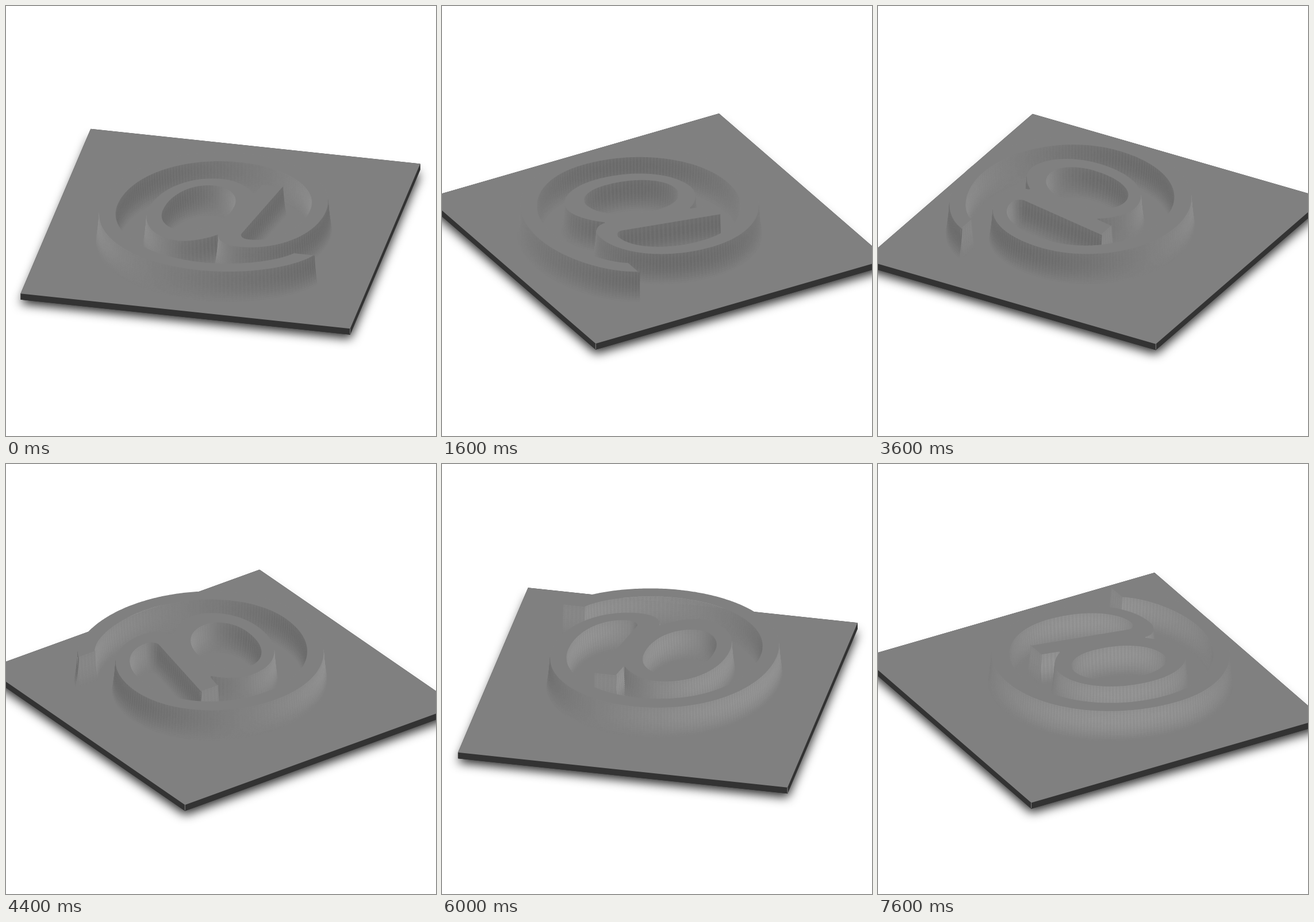
Write an HTML page with a canvas that moves like this. It is 748 px wide and 748 px high and loops after 8 s.

```html
<!DOCTYPE html>
<html lang="en">
<head>
<meta charset="utf-8">
<title>Embossed at sign on a turning plate</title>
<style>
  html, body { margin: 0; width: 100%; height: 100%; overflow: hidden; background: #fff; }
  canvas { display: block; width: 100vw; height: 100vh; }
</style>
</head>
<body>
<canvas id="stage" width="748" height="748"></canvas>
<script>
const ctx = document.getElementById('stage').getContext('2d');

const STEP_MS = 400, STEPS = 20, STEP_DEG = 12;
const PIVOT = { x: 374.2, y: 388.2 };
const TILT = 0.5;
const HALF = 293;
const THICK = 10.5;
const RELIEF = 49;
const SLICES = 16;
const GRAY = 128, CONTRAST = 19;
const DARK_SIDE = 22 * Math.PI / 180;
const ROUND = 0.565;
const STRIP = 3;

const mix = (a, b, t) => a + (b - a) * t;
const toPlate = (x, y) => [0.236 * x - 249.2, 161.6 - 0.241 * y];

// Pen in font units: every curve bends towards one corner point.
class Pen {
  constructor(x, y) { this.x = x; this.y = y; this.points = []; }

  bend(cx, cy, x, y) {
    const { x: x0, y: y0 } = this;
    const cubic = (a, c, b, t) => {
      const s = 1 - t;
      return s * s * s * a + 3 * s * s * t * mix(a, c, ROUND) +
        3 * s * t * t * mix(b, c, ROUND) + t * t * t * b;
    };
    const size = 0.24 * (Math.hypot(cx - x0, cy - y0) + Math.hypot(x - cx, y - cy)) * 0.8;
    const n = Math.max(2, Math.ceil(size / STRIP));
    for (let i = 0; i < n; i++) {
      this.points.push(toPlate(cubic(x0, cx, x, i / n), cubic(y0, cy, y, i / n)));
    }
    this.x = x;
    this.y = y;
    return this;
  }

  line(x, y) { return this.bend((this.x + x) / 2, (this.y + y) / 2, x, y); }

  // Quarter ellipses that leave horizontally or vertically.
  quarterH(x, y) { return this.bend(x, this.y, x, y); }
  quarterV(x, y) { return this.bend(this.x, y, x, y); }
}

const letter = new Pen(1138, 186)
  .bend(1010, 40, 867, 40).quarterH(551, 433).quarterV(1005, 989).bend(1170, 989, 1269, 829)
  .line(1300, 967).line(1463, 967).line(1308, 234)
  .quarterV(1371, 175).quarterH(1720, 673)
  .quarterV(1078, 1239).quarterH(327, 465).quarterV(1103, -217)
  .bend(1549, -217, 1738, 48).line(1899, 48).bend(1701, -345, 1104, -345)
  .quarterH(195, 454).quarterV(1084, 1380).quarterH(1850, 683)
  .quarterV(1314, 45).quarterH(1138, 186);

const counter = new Pen(670, 448)
  .quarterV(850, 206).quarterH(1161, 628).quarterV(963, 871).quarterH(670, 448);

// Wall strips with outward normal and tone; alternate strips give the fine ribs.
const contours = [letter, counter].map(({ points }) => points.map((a, i) => {
  const b = points[(i + 1) % points.length];
  const dx = b[0] - a[0], dy = b[1] - a[1], len = Math.hypot(dx, dy) || 1;
  const nx = dy / len, ny = -dx / len;
  const rib = i % 2 ? 1.14 : 0.86;
  return { a, b, nx, ny, tone: -CONTRAST * rib * Math.cos(Math.atan2(ny, nx) - DARK_SIDE) };
}));
const walls = contours.flat();

// Walls lean outwards at the foot; their shading fades there.
const flare = t => 6 * Math.pow(1 - t, 1.5) - 1.5;
const shade = t => Math.sin(2.2 * t);

const plate = [0, 1, 2, 3].map(i => {
  const a = (i + 0.5) * Math.PI / 2, r = HALF * Math.SQRT2;
  return [r * Math.cos(a) - 1.5, r * Math.sin(a) - 1.3];
});

function trace(points) {
  points.forEach((p, i) => i ? ctx.lineTo(p[0], p[1]) : ctx.moveTo(p[0], p[1]));
  ctx.closePath();
}

function fill(points, color) {
  ctx.beginPath();
  trace(points);
  ctx.fillStyle = color;
  ctx.fill();
}

function drawPlate(project) {
  const top = plate.map(([u, v]) => project(u, v, 0));
  const base = plate.map(([u, v]) => project(u, v, -THICK));
  ctx.save();
  ctx.shadowColor = 'rgba(0,0,0,0.86)';
  ctx.shadowBlur = 18.5;
  ctx.shadowOffsetY = 6.5;
  fill(base, '#333');
  ctx.restore();
  top.forEach((p, i) => {
    const j = (i + 1) % 4;
    fill([p, top[j], base[j], base[i]], '#333');
  });
  fill(top, '#808080');
  const front = top.reduce((m, p) => p[1] > m[1] ? p : m);
  ctx.beginPath();
  ctx.moveTo(front[0], front[1]);
  ctx.lineTo(front[0], front[1] + THICK - 1);
  ctx.strokeStyle = '#8a8a8a';
  ctx.lineWidth = 0.9;
  ctx.stroke();
}

function drawRelief(project, sin, cos) {
  const at = (p, w, t) =>
    project(p[0] + w.nx * flare(t), p[1] + w.ny * flare(t), t * RELIEF);
  const facing = walls.filter(w => sin * w.nx + cos * w.ny > -0.04);
  ctx.lineWidth = 0.7;
  // Painting slices upwards lets near walls cover far ones.
  for (let s = 0; s < SLICES; s++) {
    const low = s / SLICES, high = (s + 1) / SLICES;
    const strength = shade((low + high) / 2);
    for (const w of facing) {
      const g = Math.round(GRAY + w.tone * strength);
      const color = `rgb(${g},${g},${g})`;
      fill([at(w.a, w, low), at(w.b, w, low), at(w.b, w, high), at(w.a, w, high)], color);
      ctx.strokeStyle = color;
      ctx.stroke();
    }
  }
  ctx.beginPath();
  contours.forEach(c => trace(c.flatMap(w => [at(w.a, w, 1), at(w.b, w, 1)])));
  ctx.fillStyle = '#808080';
  ctx.fill('evenodd');
}

function draw(step) {
  const angle = (step + 1) * STEP_DEG * Math.PI / 180;
  const cos = Math.cos(angle), sin = Math.sin(angle);
  const project = (u, v, z) => [
    PIVOT.x + cos * u - sin * v,
    PIVOT.y + TILT * (sin * u + cos * v) - z
  ];
  ctx.fillStyle = '#fff';
  ctx.fillRect(0, 0, 748, 748);
  drawPlate(project);
  drawRelief(project, sin, cos);
}

let shown = -1;
function tick() {
  const step = Math.floor(performance.now() / STEP_MS) % STEPS;
  if (step !== shown) draw(shown = step);
  requestAnimationFrame(tick);
}
tick();
</script>
</body>
</html>
```
